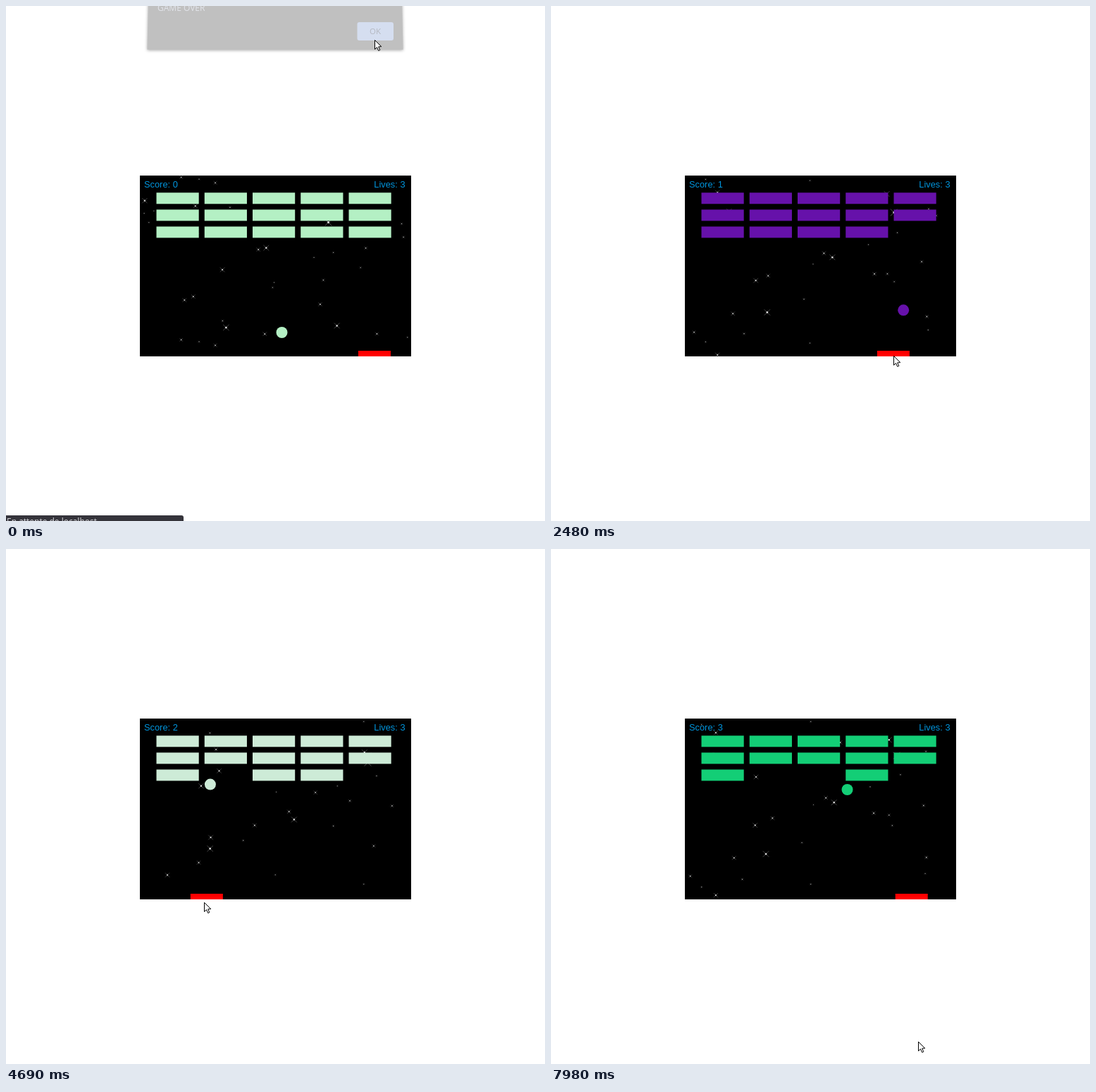
An HTML page with a canvas for the animation above (8000 ms loop, 765 px wide and 732 px high).

```html
<!DOCTYPE html>
<html lang="en">
<head>
<meta charset="utf-8">
<title>Breakout</title>
<style>
  html, body { margin: 0; width: 100%; height: 100%; overflow: hidden; background: #fff; }
  canvas { display: block; }
</style>
</head>
<body>
<canvas id="stage" width="765" height="732"></canvas>
<script>
const ctx = document.getElementById('stage').getContext('2d');
const LOOP = 8000, STEPS = 103, STEP_MS = LOOP / STEPS;
const FIELD = { x: 190, y: 241, w: 385, h: 257 };
const BRICK = { x: 213.5, y: 265.3, w: 60.2, h: 16, dx: 68.25, dy: 24.08, rows: 3, cols: 5 };

// The ball runs at a constant speed between these walls, measured at its centre.
const BALL = { x: 391.5, y: 464, radius: 8, speed: 7.51, left: 197.5, right: 566, top: 328, bottom: 482 };
const FIRST_HIT = BALL.y - BALL.top;
const HIT_GAP = 2 * (BALL.bottom - BALL.top);
const COLORS = ['#b4f0c4', '#6611aa', '#cdebd7', '#13ce76'];

// Where the hand rests or turns: step, x, y
const POINTER = [
  [0, 523, 48], [9, 413, 397], [14, 440, 502], [32, 486, 497], [49, 344, 497],
  [71, 217, 507], [87, 308, 498], [94, 400, 505], [98, 449, 686], [103, 529, 702]
];

const SKY_LOOP = 5150, TILE_H = 231;
const UI_FONT = '"Open Sans", "Noto Sans", sans-serif';

function seeded(seed) {
  return () => (seed = seed * 16807 % 2147483647) / 2147483647;
}

const random = seeded(2024);
const stars = Array.from({ length: 34 }, () => ({
  x: FIELD.x + random() * FIELD.w,
  y: FIELD.y + random() * TILE_H,
  orbit: 20 + 50 * random(),
  angle: 2 * Math.PI * random(),
  spin: random() < 0.5 ? -0.35 : 0.35,
  brightness: random() ** 2
}));

// Bounce a straight path back and forth between two walls.
function fold(value, low, high) {
  const span = high - low;
  const along = (((value - low) % (2 * span)) + 2 * span) % (2 * span);
  return low + Math.min(along, 2 * span - along);
}

function ballAt(distance) {
  return {
    x: fold(BALL.x + distance, BALL.left, BALL.right),
    y: fold(BALL.y - distance, BALL.top, BALL.bottom)
  };
}

function pointerAt(step) {
  const i = POINTER.findIndex(key => key[0] > step);
  if (i < 1) return POINTER[0].slice(1);
  const [s0, x0, y0] = POINTER[i - 1], [s1, x1, y1] = POINTER[i];
  const f = (step - s0) / (s1 - s0);
  const ease = f * f * (3 - 2 * f);
  return [x0 + (x1 - x0) * ease, y0 + (y1 - y0) * ease];
}

function rect(x, y, w, h, color) {
  ctx.fillStyle = color;
  ctx.fillRect(x, y, w, h);
}

function roundRect(x, y, w, h, r, color) {
  ctx.fillStyle = color;
  ctx.beginPath();
  ctx.roundRect(x, y, w, h, r);
  ctx.fill();
}

function disc(x, y, r, color) {
  ctx.fillStyle = color;
  ctx.beginPath();
  ctx.arc(x, y, r, 0, 2 * Math.PI);
  ctx.fill();
}

function polygon(points) {
  ctx.beginPath();
  points.forEach(p => ctx.lineTo(...p));
  ctx.closePath();
}

function label(text, x, y, font, color) {
  ctx.font = font;
  ctx.fillStyle = color;
  ctx.fillText(text, x, y);
}

function drawStar(x, y, brightness) {
  const arm = 1 + 4 * brightness;
  ctx.strokeStyle = `rgba(255,255,255,${0.15 + 0.25 * brightness})`;
  ctx.lineWidth = 0.8;
  ctx.beginPath();
  for (const side of [-1, 1]) {
    ctx.moveTo(x - arm, y - side * arm);
    ctx.lineTo(x + arm, y + side * arm);
  }
  ctx.stroke();
  disc(x, y, 0.6 + 0.9 * brightness, `rgba(255,255,255,${0.45 + 0.5 * brightness})`);
}

function drawSky(ms) {
  const seconds = ms % SKY_LOOP / 1000;
  ctx.save();
  ctx.beginPath();
  ctx.rect(FIELD.x, FIELD.y, FIELD.w, FIELD.h);
  ctx.clip();
  rect(FIELD.x, FIELD.y, FIELD.w, FIELD.h, '#000');
  for (const s of stars) {
    const angle = s.angle + s.spin * seconds;
    const x = s.x + s.orbit * (Math.cos(angle) - Math.cos(s.angle));
    const y = s.y + s.orbit * (Math.sin(angle) - Math.sin(s.angle));
    for (const tile of [-1, 0, 1]) drawStar(x, y + tile * TILE_H, s.brightness);
  }
  ctx.restore();
}

// Each time the ball reaches the bricks it removes the one in the bottom row above it.
function brokenColumns(distance) {
  const columns = [];
  for (let d = FIRST_HIT; d <= distance; d += HIT_GAP) {
    columns.push(Math.floor((ballAt(d).x - BRICK.x) / BRICK.dx));
  }
  return columns;
}

function drawGame(step) {
  const distance = step * BALL.speed;
  const broken = brokenColumns(distance);
  const color = COLORS[broken.length];
  for (let row = 0; row < BRICK.rows; row++) {
    for (let col = 0; col < BRICK.cols; col++) {
      if (row === BRICK.rows - 1 && broken.includes(col)) continue;
      rect(BRICK.x + col * BRICK.dx, BRICK.y + row * BRICK.dy, BRICK.w, BRICK.h, color);
    }
  }
  const ball = ballAt(distance);
  disc(ball.x, ball.y, BALL.radius, color);
  rect(pointerAt(step - 0.5)[0] - 23, 490, 46, 8, '#f00');
  const font = '12.84px "Liberation Sans", Arial, sans-serif';
  label('Score: ' + broken.length, 196, 257.7, font, '#0095dd');
  label('Lives: 3', 522.3, 257.7, font, '#0095dd');
}

function drawDialog() {
  ctx.save();
  ctx.shadowColor = 'rgba(0,0,0,0.35)';
  ctx.shadowBlur = 4;
  ctx.shadowOffsetY = 1;
  ctx.fillStyle = '#c0c0c0';
  polygon([[202, -5], [562, -5], [563.5, 62], [200.5, 62]]);
  ctx.fill();
  ctx.restore();
  label('GAME OVER', 215, 7, '12px ' + UI_FONT, '#e2e4ea');
  roundRect(498.5, 23, 51.5, 26, 3, '#d5def0');
  label('OK', 516, 40, '11.5px ' + UI_FONT, '#b4b8c0');
}

function drawStatusBar() {
  roundRect(-4, 724, 256, 20, 3, '#35343b');
  label('En attente de localhost...', 1, 737, '12px ' + UI_FONT, '#d8d8dc');
}

function drawPointer(x, y) {
  ctx.save();
  ctx.translate(Math.round(x), Math.round(y));
  polygon([[0.5, 0.5], [0.5, 13.5], [3.5, 10.7], [5.7, 15.5], [7.8, 14.6], [5.7, 9.9], [9.8, 9.7]]);
  ctx.fillStyle = '#fff';
  ctx.fill();
  ctx.strokeStyle = '#000';
  ctx.lineWidth = 1;
  ctx.stroke();
  ctx.restore();
}

function draw(ms) {
  const step = Math.min(STEPS - 1, Math.floor(ms / STEP_MS + 0.1));
  rect(0, 0, 765, 732, '#fff');
  drawSky(step * STEP_MS);
  drawGame(step);
  if (step === 0) {
    drawDialog();
    drawStatusBar();
  }
  drawPointer(...pointerAt(step));
}

let start;
function tick(now) {
  start ??= now;
  draw((now - start) % LOOP);
  requestAnimationFrame(tick);
}
requestAnimationFrame(tick);
</script>
</body>
</html>
```
